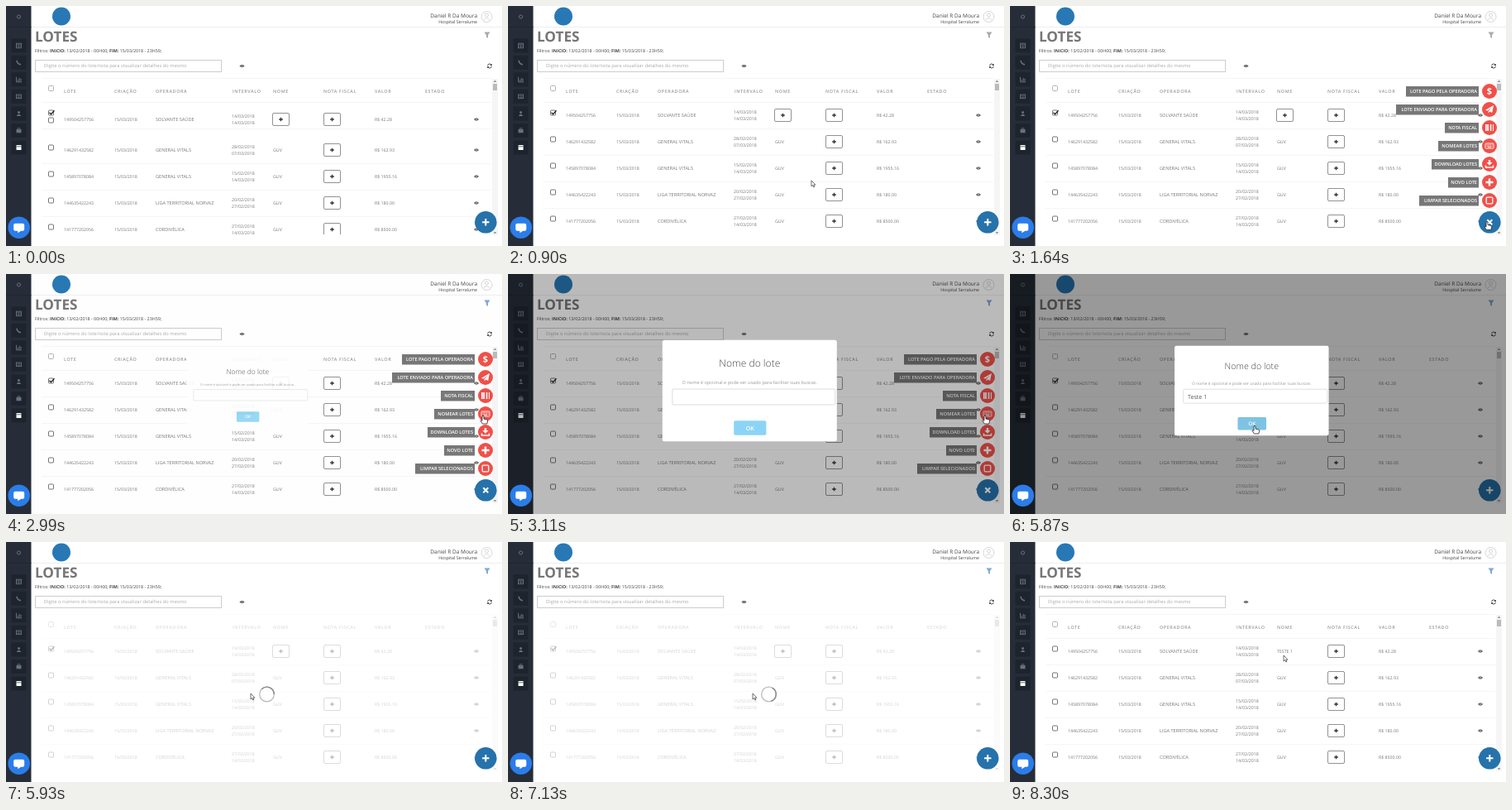
These frames come from a looping animation (600x290 px, 8760 ms). An HTML page:

```html
<!DOCTYPE html>
<html lang="pt-BR">
<head>
<meta charset="utf-8">
<title>Lotes</title>
<style>
html,body{margin:0;width:100%;height:100%;overflow:hidden;background:#fff}
svg{display:block;width:600px;height:290px}
text{font-family:"Open Sans","Noto Sans",sans-serif;font-size:5.25px;fill:#777;text-rendering:geometricPrecision;white-space:pre}
.b{font-weight:700}
.head{font-weight:600;font-size:5.4px;letter-spacing:.6px;fill:#999}
.label{font-weight:600;font-size:5.65px;fill:#fff;text-anchor:end}
.mid{text-anchor:middle}
.end{text-anchor:end}
</style>
</head>
<body>
<svg id="stage" viewBox="0 0 600 290"></svg>
<script>
const LOOP = 8760;
const at = (x, y, inner, attrs = '') => `<g transform="translate(${x} ${y})" ${attrs}>${inner}</g>`;
const text = (x, y, s, attrs = '') => `<text x="${x}" y="${y}" ${attrs}>${s}</text>`;
const rect = (x, y, w, h, attrs = '') => `<rect x="${x}" y="${y}" width="${w}" height="${h}" ${attrs}/>`;
const path = (d, attrs = '') => `<path d="${d}" ${attrs}/>`;
const circle = (x, y, r, attrs = '') => `<circle cx="${x}" cy="${y}" r="${r}" ${attrs}/>`;
const stroke = (c, w = 1) => `fill="none" stroke="${c}" stroke-width="${w}"`;

const eye = (x, y) => at(x, y,
  path('M-3 0Q0-3.6 3 0Q0 3.6-3 0Z', 'fill="#444"') + circle(0, 0, 1.1, stroke('#fff', .5)));
const box = (y, c = '#666') => rect(51.5, y - 3, 6, 6, `rx="1" ${stroke(c, .9)}`);
const plusButton = x =>
  rect(x + .5, 124.5, 20, 15, `rx="1.5" ${stroke('#777', .8)}`) +
  path(`M${x + 8.2} 132h4.600m-2.300-2.300v4.600`, stroke('#333', 1.3));

// Table
const rows = [
  ['149504257756', 'SOLVANTE SAÚDE', '14/03/2018', '14/03/2018', '42.28'],
  ['146291432582', 'GENERAL VITALS', '28/02/2018', '07/03/2018', '162.93'],
  ['145897078084', 'GENERAL VITALS', '15/02/2018', '14/03/2018', '1955.16'],
  ['144635422243', 'LIGA TERRITORIAL NORVAZ', '20/02/2018', '27/02/2018', '180.00'],
  ['141777202056', 'CORDIVÉLICA', '27/02/2018', '14/03/2018', '8500.00']
];
const heads = [[70, 'LOTE'], [131, 'CRIAÇÃO'], [181, 'OPERADORA'], [274, 'INTERVALO'],
  [323, 'NOME'], [384, 'NOTA FISCAL'], [446, 'VALOR'], [507, 'ESTADO']];

const cells = ([lot, payer, from, to, value], i) =>
  text(70, 134, lot) + text(131, 134, '15/03/2018') +
  text(181, 134, payer, 'style="font-size:5.6px"') +
  text(273, 129.5, from) + text(273, 138, to) +
  (i ? text(323, 134, 'GUV')
     : `<g id="addName">${plusButton(322)}</g>` + text(323, 134, 'TESTE 1', 'id="newName"')) +
  plusButton(384) + text(446, 134, 'R$ ' + value) + eye(569, 132);

const table =
  box(99.5, '#aaa') + heads.map(([x, s]) => text(x, 104.5, s, 'class="head"')).join('') +
  path('M43 87.5H587M43 116.5H587', stroke('#f5f5f5')) +
  rows.map((r, i) => at(0, 32 * i,
    box(129) + (i ? '' : `<g id="ghost">${box(138)}</g>` +
      path('M52.5 128.8l2 2 4-4.6', `id="check" ${stroke('#222', 1.3)}`)) +
    `<g class="cells">${cells(r, i)}</g>` +
    path('M43 148.5H587', stroke('#f5f5f5')), 'class="row"')).join('');

const scrollbar = rect(588, 88, 7, 189, 'fill="#f5f5f5"') + rect(589, 94, 5, 8, 'fill="#bbb"') +
  path('M589.5 92l2-2.5 2 2.5zM589.5 273l2 2.5 2-2.5z', 'fill="#999"');

// Side bar
const dim = '#69717c';
const sideIcons = [
  rect(-3, -2.5, 6, 5.5, stroke(dim, .9)) + path('M-3-1h6M0-1v4M-3 1h6', stroke(dim, .6)),
  path('M-2.5-2.5Q-2 2 2.5 2.5', stroke(dim, 1.6)),
  path('M-3-3v6h6.500M-1 2v-2M.8 2v-4M2.600 2v-3', stroke(dim, 1)),
  rect(-3, -2.3, 6, 4.6, stroke(dim, .9)) + path('M-2-.6h4M-2 1h4', stroke(dim, .7)),
  circle(0, -1.5, 1.5, `fill="${dim}"`) + path('M-2.8 3Q0-1.500 2.800 3z', `fill="${dim}"`),
  rect(-3, -1.5, 6, 4.3, `fill="${dim}"`) + path('M-1.300-1.500v-1.300h2.600v1.300', stroke(dim, .8)),
  rect(-3, -3, 6, 6, 'rx=".6" fill="#fff"') + path('M-3-1.200h6', stroke('#232a35', .7))
];
const sidebar = rect(0, 0, 30.5, 290, 'fill="#262d38"') + circle(15.5, 13, 2, stroke(dim)) +
  path('M0 25.500H30.500', stroke('#20262f')) +
  sideIcons.map((s, i) => at(15.5, 47.7 + 20.55 * i, rect(-9, -8.5, 18, 17, 'rx="1" fill="#1e242d"') + s)).join('');

// Page header and search
const header =
  path('M31 25.500H600', stroke('#eee')) + circle(67, 12.5, 11, 'fill="#2878b5"') +
  text(570, 13.6, 'Daniel R Da Moura', 'class="end" style="font-size:6.5px;fill:#444"') +
  text(570, 21.4, 'Hospital Serralume', 'class="end" style="fill:#444"') +
  circle(581.5, 13, 6.5, stroke('#ccc', .8)) + circle(581.5, 11, 2, stroke('#ccc', .8)) +
  path('M577.800 17q3.700-5 7.400 0', stroke('#ccc', .8)) +
  text(35, 43.1, 'LOTES', 'class="b" style="font-size:17.2px"') +
  at(582, 35, path('M-3.500-3.500h7L1 .3V4L-1 2.500V.3z', 'id="funnel"')) +
  text(35, 56, 'Filtros: <tspan class="b">INICIO:</tspan> 13/02/2018 - 00H00; <tspan class="b">FIM:</tspan> 15/03/2018 - 23H59;',
    'style="font-size:5.35px;fill:#444"') +
  rect(35.5, 65.5, 225, 14, stroke('#ccc')) +
  text(46, 74.4, 'Digite o número do lote/nota para visualizar detalhes do mesmo', 'style="font-size:5.75px;fill:#aaa"') +
  eye(285.5, 72.5) +
  at(585, 72.5, path('M-2.400-.4A2.400 2.400 0 0 1 2-1.400M2.400.4A2.400 2.400 0 0 1-2 1.400', stroke('#333', .9)) +
    path('M2.800-2.800v2.300H.5zM-2.800 2.800V.5H-.5z', 'fill="#333"'));

// Floating menu
const white = (d, w = 1.2) => path(d, stroke('#fff', w));
const actions = [
  ['LOTE PAGO PELA OPERADORA', 88, text(0, 4, '$', 'class="b mid" style="font-size:11px;fill:#fff"')],
  ['LOTE ENVIADO PARA OPERADORA', 100, path('M-5 .8L5-5 3.200 4 .2 2.600-1.300 4.800V2L3-2.500-2.500 1.700z', 'fill="#fff"')],
  ['NOTA FISCAL', 41, white('M-4.500-4v8M-1.300-4v8M4.500-4v8', 1) + white('M-2.900-4v8M1.600-4v8', 1.5)],
  ['NOMEAR LOTES', 49, rect(-5, -3, 10, 6, 'rx=".8" ' + stroke('#fff', .9)) +
    path('M-3.500-1.200h7M-3.500.3h7', stroke('#fff', .9) + ' stroke-dasharray="1 .6"') + white('M-2 1.700h4', .8)],
  ['DOWNLOAD LOTES', 57, path('M-1.200-5h2.400v3h2.300L0 1.800-3.500-2h2.300z', 'fill="#fff"') + white('M-4.500 1.500v2.500h9v-2.500', 1.5)],
  ['NOVO LOTE', 37, white('M-4.500 0h9M0-4.500v9', 2.4)],
  ['LIMPAR SELECIONADOS', 72, rect(-3.8, -3.8, 7.6, 7.6, 'rx="1" ' + stroke('#fff', 1.3))]
];
const menu = actions.map(([s, w, icon], i) => at(0, 103 + 22 * i,
  rect(567 - w, -6, w, 12.5, 'fill="#777"') + text(565, 2, s, 'class="label"') +
  at(580, 0, `<g class="item">${circle(0, 0, 9, 'fill="#f0504a"')}${icon}</g>`))).join('');
const fab = at(580.3, 261.3, circle(0, 0, 13.3, 'fill="#2672ab"') +
  path('M-4.200 0h8.400M0-4.200v8.400', `id="fabPlus" ${stroke('#fff', 2)}`));

// Dialog, centred on its own origin
const dialog =
  rect(-105, -61, 210, 122, 'rx="2.5" fill="#fff"') +
  text(0, -29, 'Nome do lote', 'class="mid" style="font-size:12px;font-weight:300;fill:#444"') +
  text(0, -8, 'O nome é opcional e pode ser usado para facilitar suas buscas.', 'class="mid" style="font-size:5.55px;fill:#999"') +
  rect(-93, -2, 196, 19, 'id="field" rx="1.5" fill="#fff"') +
  text(-87, 11, '', 'id="typed" style="font-size:8px;fill:#555"') +
  path('M0 3v9.500', `id="caret" ${stroke('#333', .7)}`) +
  rect(-19, 36, 39, 17.5, 'id="ok" rx="2"') +
  text(.5, 47.3, 'OK', 'class="mid" style="font-size:7px;font-weight:600;fill:#fff"');

const arrow = path('M0 0V7L1.700 5.600 2.800 8 3.900 7.500 2.800 5.200H4.900z', 'fill="#fff" stroke="#333" stroke-width=".7"');
const hand = path('M-1 .8Q0-.6 1 .8V4L5 5Q6 5.300 5.600 7L4.800 10H-.6L-3 6.500Q-3.200 5-1 6.300z', 'fill="#fff" stroke="#222" stroke-width=".8"');
const chat = at(15.7, 267.7, circle(0, 0, 13.3, 'fill="#2b7de9"') +
  path('M-4.500-5H4.500Q6.500-5 6.500-3V2Q6.500 4 4.500 4H2.500L-1.500 6.500V4H-4.500Q-6.500 4-6.500 2V-3Q-6.500-5-4.500-5z', 'fill="#fff"'));

document.getElementById('stage').innerHTML =
  '<clipPath id="view"><rect x="40" y="86" width="548" height="190"/></clipPath>' +
  rect(0, 0, 600, 290, 'fill="#fff"') + header +
  `<g clip-path="url(#view)">${table}</g>` + scrollbar +
  `<g id="veil">${rect(42, 86, 554, 191, 'fill="#fff" opacity=".68"')}` +
  at(315.5, 184, circle(0, 0, 8.8, stroke('#bbb', 1.3)) +
    path('M-6.200-6.200A8.800 8.800 0 0 1 8.800 0', `id="spin" ${stroke('#888', 1.4)}`)) + '</g>' +
  sidebar + `<g id="menu">${menu}</g>` + fab +
  rect(0, 0, 600, 290, 'id="shade" fill="#000"') + chat +
  `<g id="dialog">${dialog}</g><g id="cursor"><g id="arrow">${arrow}</g><g id="hand">${hand}</g></g>`;

// Motion
const el = Object.fromEntries([...document.querySelectorAll('#stage [id]')].map(e => [e.id, e]));
const rowEls = document.querySelectorAll('.row'), firstCells = document.querySelector('.cells');
const items = document.querySelectorAll('.item');
const show = (e, on) => e.style.display = on ? '' : 'none';
const move = (e, s) => e.setAttribute('transform', s);
const linear = p => p, smooth = p => p * p * (3 - 2 * p);

// Value at time t along [time, value] keys
function track(t, keys, ease = linear) {
  if (t <= keys[0][0]) return keys[0][1];
  for (let i = 1; i < keys.length; i++) {
    const [a, u] = keys[i - 1], [b, v] = keys[i];
    if (t < b) return u + (v - u) * ease((t - a) / (b - a));
  }
  return keys[keys.length - 1][1];
}

const cursorX = [[600, 70], [1140, 577], [3310, 577], [3490, 317], [5000, 317], [5420, 296], [7890, 296], [8300, 331]];
const cursorY = [[600, 140], [1140, 261], [1600, 261], [2490, 171], [3310, 171], [3490, 137], [5000, 137], [5420, 183], [7890, 183], [8300, 137]];
const menuOpen = [[1140, 0], [1380, 1], [3310, 1], [3490, 0]];
const dialogScale = [[2990, .7], [3080, 1.05], [3135, .97], [3170, 1], [5810, 1], [5930, .78]];

function draw(t) {
  const first = t < 60, saved = t >= 7550;
  rowEls.forEach((r, i) => move(r, `translate(0 ${32 * i + (first && i ? 10 : 0)})`));
  move(firstCells, `translate(0 ${first ? 5 : 0})`);
  show(el.ghost, first);
  show(el.check, !saved);
  show(el.addName, !saved);
  show(el.newName, saved);
  el.funnel.setAttribute('fill', t < 2810 ? '#aaa' : '#7fa9d6');

  const open = track(t, menuOpen, smooth);
  el.menu.style.opacity = open;
  items.forEach(e => move(e, `scale(${open})`));
  move(el.fabPlus, `rotate(${45 * open})`);

  show(el.shade, t < 5930);
  el.shade.style.opacity = track(t, [[2990, 0], [3170, .4]]);
  show(el.dialog, t >= 2990 && t < 5930);
  el.dialog.style.opacity = track(t, [[2990, .9], [3080, 1]]);
  move(el.dialog, `translate(292.3 141) scale(${track(t, dialogScale)})`);

  const count = t < 4020 ? 0 : t < 4660 ? Math.min(5, 1 + Math.floor((t - 4020) / 77.5)) : t < 4720 ? 6 : 7;
  const focused = t >= 3170 && t < 5750;
  const blinkFrom = t < 4020 ? 3290 : t < 4660 ? 4330 : 4720;
  el.typed.textContent = 'Teste 1'.slice(0, count);
  show(el.caret, focused && (t - blinkFrom) % 1060 < 530);
  move(el.caret, `translate(${-86.5 + (count ? el.typed.getComputedTextLength() : 0)} 0)`);
  el.field.setAttribute('stroke', focused ? '#9fd0ea' : '#ddd');
  el.ok.setAttribute('fill', t < 5300 ? '#8cd4f5' : t < 5750 ? '#86cceb' : '#7fc3e2');

  show(el.veil, t >= 5930 && t < 7610);
  el.veil.style.opacity = track(t, [[7530, 1], [7610, 0]]);
  move(el.spin, `rotate(${(t - 5930) * .36})`);

  const pointing = t > 1080 && t < 3370 || t >= 5300 && t < 5930;
  show(el.cursor, t >= 660);
  show(el.hand, pointing);
  show(el.arrow, !pointing);
  move(el.cursor, `translate(${track(t, cursorX, smooth)} ${track(t, cursorY, smooth)})`);
}

const start = performance.now();
function tick() {
  draw((performance.now() - start) % LOOP);
  requestAnimationFrame(tick);
}
tick();
</script>
</body>
</html>
```
